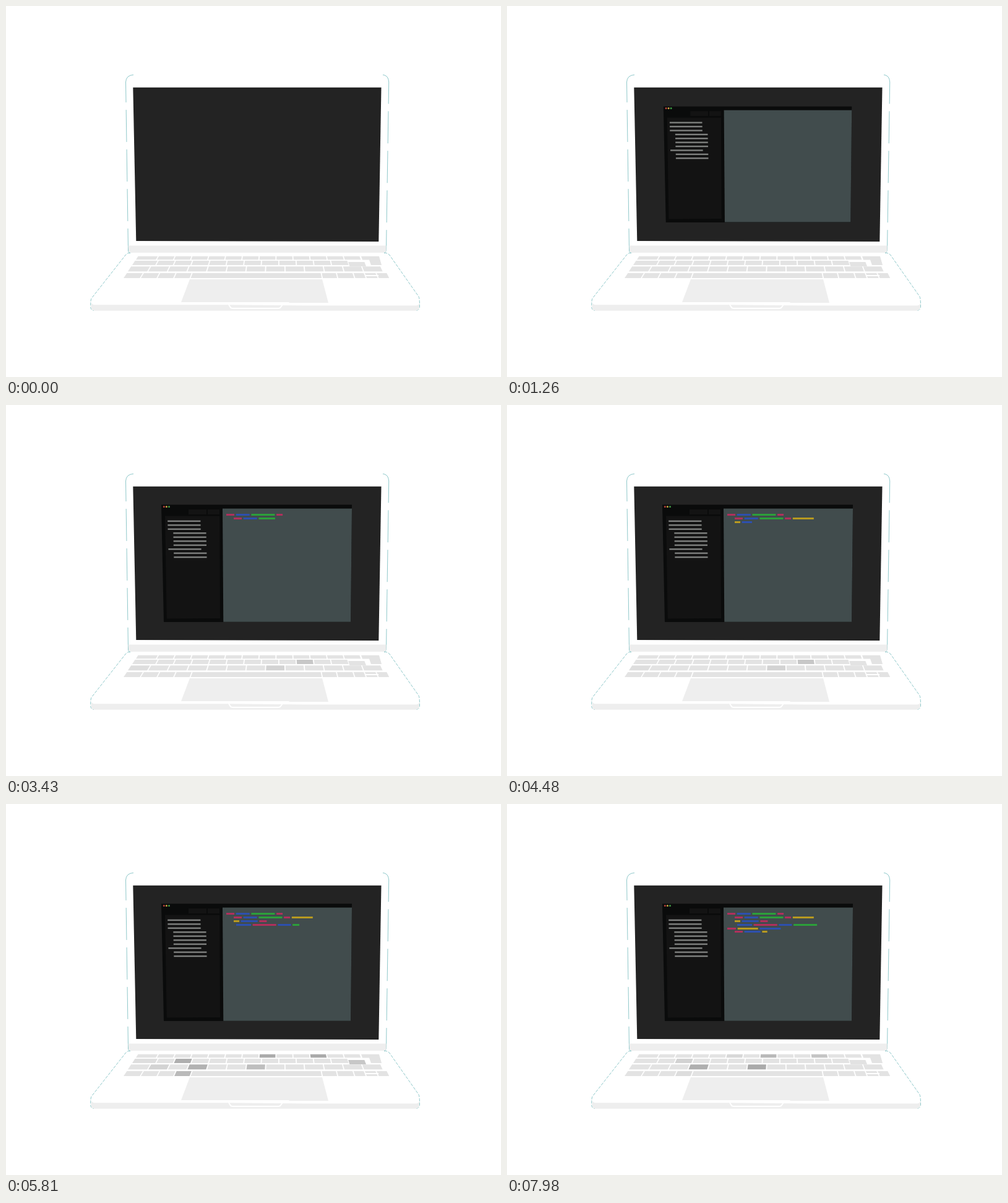
These frames come from a looping animation (800 by 600 pixels, 8000 ms). An HTML page with a canvas:

```html
<!DOCTYPE html>
<html lang="en">
<head>
<meta charset="utf-8">
<title>Laptop typing code</title>
<style>
  html, body { margin: 0; width: 100%; height: 100%; overflow: hidden; background: #fff; }
  canvas { display: block; }
</style>
</head>
<body>
<canvas id="stage" width="800" height="600"></canvas>
<script>
const ctx = document.getElementById('stage').getContext('2d');
const LOOP = 8000, STEP = 70, OPEN_TIME = 1470;
const CYCLE = 1050, TYPING_START = 1830;  // one code line and one round of key presses per cycle
const COLORS = { P: '#b0305c', B: '#2d50ae', G: '#2ca03a', Y: '#b89a20' };

// Each line: left edge, then words as colour letter and width
const codeLines = [
  '356 P13 B22 G38 P10',
  '368 P13 B22 G38 P10 Y34',
  '368 Y9 B27 P12',
  '372 B24 P38 B21 G38',
  '356 P14 Y33 B34',
  '368 P13 B26 Y17'
].map(line => {
  const [left, ...words] = line.split(' ');
  let x = +left;
  const bars = words.map(word => {
    const bar = { x, width: +word.slice(1), color: COLORS[word[0]] };
    x += bar.width + 2.7;
    return bar;
  });
  return { left: +left, length: x - 2.7 - left, bars };
});

// Keys pressed one after another (row letter, column), '-' is a rest
const rhythm = 'b9 c7 c0 b0 c1 b12 d3 b2 a10 a7 c3 c6 - - - - a5'.split(' ');

// Left edges of all keys in a row, closed by the right end
const evenRow = (first, second, pitch) =>
  [first, ...Array.from({ length: 13 }, (_, i) => second + i * pitch)];

const keyRows = [
  { name: 'a', top: 404.7, bottom: 410.3, edges: evenRow(210, 244, 27.6) },
  { name: 'b', top: 412, bottom: 419, edges: evenRow(204, 243, 28.4) },
  { name: 'c', top: 421.3, bottom: 429.3, edges: evenRow(197, 230, 31.7) },
  { name: 'd', top: 432, bottom: 440, edges: [190, 218, 245, 272, 298.5, 512, 537, 564.5, 583, 602.5, 621] }
];

function poly(color, ...points) {
  ctx.fillStyle = color;
  ctx.beginPath();
  for (let i = 0; i < points.length; i += 2) ctx.lineTo(points[i], points[i + 1]);
  ctx.fill();
}

function rect(color, x, y, w, h) {
  ctx.fillStyle = color;
  ctx.fillRect(x, y, w, h);
}

function stroke(color, width, path, dash = []) {
  ctx.strokeStyle = color;
  ctx.lineWidth = width;
  ctx.setLineDash(dash);
  ctx.stroke(new Path2D(path));
}

function fillPath(color, path) {
  ctx.fillStyle = color;
  ctx.fill(new Path2D(path));
}

// Key sides converge in perspective
function key(color, left, right, top, bottom) {
  const lean = x => x - (x - 440) * 0.0027 * (bottom - top);
  poly(color, lean(left), top, lean(right), top, right, bottom, left, bottom);
}

function keyColor(id, t) {
  const slot = rhythm.indexOf(id);
  const distance = Math.abs(t % CYCLE - (360 + slot * 24));
  const pressed = slot >= 0 && t >= CYCLE && distance < 160;
  const grey = Math.round(227 - (pressed ? 57 * Math.cos(distance / 320 * Math.PI) ** 2 : 0));
  return `rgb(${grey},${grey},${grey})`;
}

function drawKeyboard(t) {
  for (const { name, top, bottom, edges } of keyRows) {
    edges.slice(0, -1).forEach((left, col) => {
      const id = name + col, drop = id === 'b12' ? 2 : 0;
      key(keyColor(id, t), left, edges[col + 1] - 1.8, top + drop, bottom + drop);
    });
  }
  poly('#e3e3e3', 574, 404.7, 603, 404.7, 607, 419, 590, 419, 587, 410.5, 576, 410.5);
  rect('#fff', 580, 435, 22, 2);
}

function drawLaptop() {
  rect('#fff', 0, 0, 800, 600);
  const teal = '#5fb0b4';
  stroke(teal, 0.7, 'M206 111.3Q194 112 193.5 123L197.5 394Q197 399 201 399.3', [52, 12]);
  stroke(teal, 0.7, 'M609 111.3Q618 112 618.7 123L614.5 394Q614 399 611 399.3', [52, 12]);
  stroke(teal, 0.7, 'M201 399.3Q196 399 193 403L138 473Q136.5 476 136.7 487Q137 492 142 492.5', [5, 2]);
  stroke(teal, 0.7, 'M611 399.3Q617 399 620 403L667 470Q668.5 473 668.5 486Q668 492 663 492.5', [5, 2]);
  fillPath('#eee', 'M197.5 387.5H614.5V395Q614 399 610 399H202Q198 399 198 395Z');
  fillPath('#eee', 'M138 480Q139 483 143 483.2H360L490 484.5H663Q667 484 668 481V487Q667 492.7 662 492.7H143Q138 492.5 137.5 487Z');
  poly('#eee', 297, 442, 511, 442, 521, 480, 458, 480, 457, 479, 283, 479);
  stroke('#fff', 2, 'M360 483L362.5 487Q363.5 489 366 489H440Q443 489 444 487L447 483');
  poly('#232323', 205.3, 131.8, 606.5, 131.8, 602.3, 381, 210.3, 380);
}

// Every line is uncovered from left to right in one cycle
function drawCode(t) {
  codeLines.forEach(({ left, length, bars }, row) => {
    const progress = Math.min((t - TYPING_START) / CYCLE - row, 1);
    const cursor = left + length * progress;
    for (const { x, width, color } of bars) {
      if (cursor > x) rect(color, x, Math.round(175.9 + row * 5.9), Math.min(width, cursor - x), 3);
    }
  });
}

function drawWindow(t) {
  const p = Math.min(t / OPEN_TIME, 1);
  const scale = p < 0.5 ? 4 * p ** 3 : 1 - 4 * (1 - p) ** 3;
  if (!scale) return;
  ctx.save();
  ctx.translate(405, 256.3);
  ctx.scale(scale, scale);
  ctx.translate(-405, -256.3);
  poly('#0a0b0b', 251, 161.3, 559, 161.3, 557, 351, 255, 351);
  poly('#414c4d', 350, 167.5, 559, 167.5, 557, 350.7, 351.3, 350.7);
  poly('#131313', 257, 179.5, 345.3, 179.5, 346, 345, 259.7, 345.5);
  rect('#131313', 295, 169, 29, 8);
  rect('#131313', 326, 169, 19, 8);
  ['#b8403c', '#c8a640', '#3f9c45'].forEach((color, i) => {
    ctx.fillStyle = color;
    ctx.beginPath();
    ctx.arc(255.3 + i * 4.1, 164.4, 1.5, 0, 7);
    ctx.fill();
  });
  [...'0001111011'].forEach((indent, i) =>
    rect('#7f817f', 261.2 + indent * 8.6 + i * 0.17, 186.6 + i * 6.48, 53.2, 2.4));
  drawCode(t);
  ctx.restore();
}

function frame(now) {
  const t = Math.floor(now % LOOP / STEP) * STEP;
  drawLaptop();
  drawKeyboard(t);
  drawWindow(t);
  requestAnimationFrame(frame);
}
requestAnimationFrame(frame);
</script>
</body>
</html>
```
